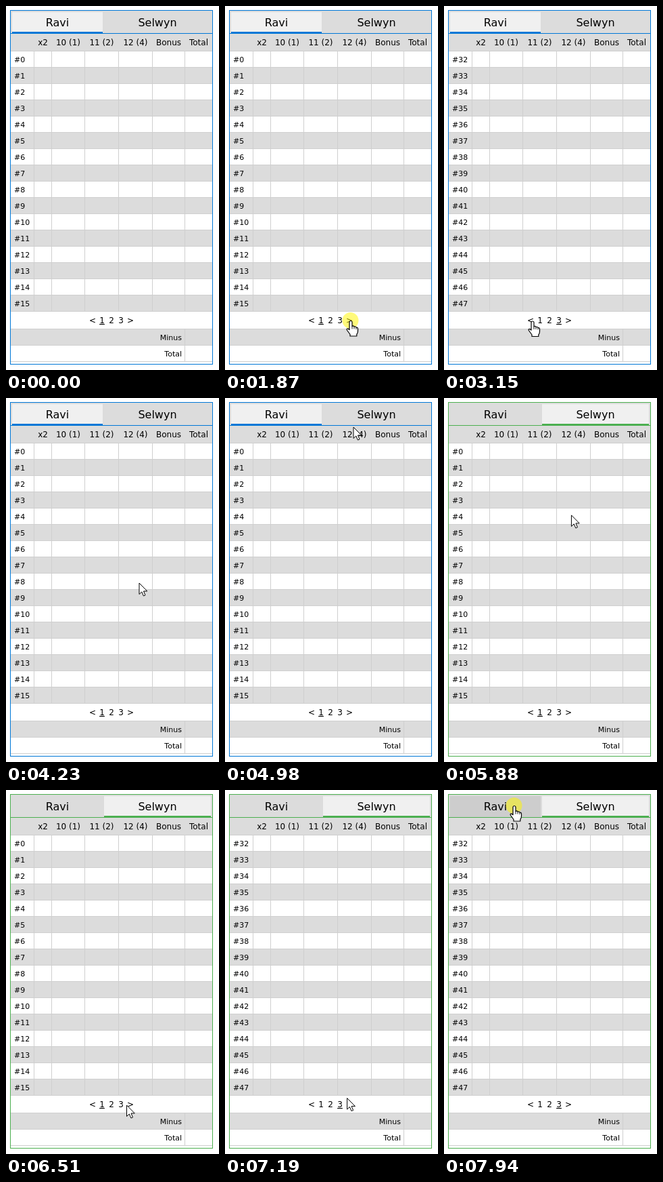
An HTML page for the animation above (8000 ms loop, 315x537 px).

```html
<!DOCTYPE html>
<html lang="en">
<head>
<meta charset="utf-8">
<title>Score sheet</title>
<style>
  html, body { margin: 0; width: 100%; height: 100%; overflow: hidden; background: #fff; }
  svg { display: block; width: 100vw; height: 100vh; font: 12px "DejaVu Sans", Verdana, sans-serif; }
  .name { font-size: 16px; }
  .small { font-size: 11px; }
</style>
</head>
<body>
<svg id="stage" viewBox="0 0 315 537"></svg>
<script>
const LOOP = 8000, ROWS = 16, ROW_H = 24, TOP = 67, LEFT = 7, WIDTH = 298;
const BLUE = [0, 120, 215], GREEN = [76, 175, 80];
const IDLE = [220, 220, 220], ACTIVE = [240, 240, 240], HOVER = 'rgb(205,205,205)';
const GREY = '#dcdcdc', LINE = '#cfcfcf';
const SWITCH = 5315, SWITCH_TIME = 500, HOLD = 65;

// [time, page step]; the step happens when the button is released
const clicks = [[1870, 1], [2470, 1], [3350, -1], [3760, -1], [5240, 0], [6780, 1], [7060, 1], [7935, 0]];

// pointer moves: [from, to, x, y]
const entry = { time: 530, x: 299, y: 421 };
const moves = [
  [530, 1140, 185.5, 464],
  [2540, 3150, 130.5, 464.5],
  [4090, 4230, 197, 273],
  [4230, 4850, 190, 43],
  [4980, 5240, 210, 23],
  [5300, 5470, 193.5, 23.5],
  [5470, 6510, 178.5, 465],
  [6510, 6650, 183, 463.5],
  [7130, 7800, 66, 24],
  [7800, 7930, 103.5, 23]
];

const tabs = [
  { name: 'Ravi', x: 9, w: 134, mid: 76 },
  { name: 'Selwyn', x: 145, w: 158, mid: 224 }
];
const heads = ['x2', '10 (1)', '11 (2)', '12 (4)', 'Bonus', 'Total'];
const edges = [41, 67, 116, 166, 216, 264, 305];

const stage = document.getElementById('stage');

function set(el, attrs) {
  for (const k in attrs) el.setAttribute(k, attrs[k]);
}
function add(parent, tag, attrs, text = '') {
  const el = document.createElementNS(stage.namespaceURI, tag);
  set(el, attrs);
  el.textContent = text;
  return parent.appendChild(el);
}
const rect = (p, x, y, width, height, fill) => add(p, 'rect', { x, y, width, height, fill });
const label = (p, x, y, text, anchor = 'middle', cls = '') =>
  add(p, 'text', { x, y, 'text-anchor': anchor, class: cls }, text);
const show = (el, on) => el.setAttribute('display', on ? 'inline' : 'none');

const lerp = (a, b, k) => a + (b - a) * k;
const mix = (a, b, k) => `rgb(${a.map((v, i) => Math.round(lerp(v, b[i], k)))})`;
const span = (t, from, to) => Math.min(1, Math.max(0, (t - from) / (to - from)));
const ease = k => (1 - Math.cos(Math.PI * k)) / 2;

rect(stage, 0, 0, 315, 537, '#fff');

// table
const table = add(stage, 'g', {});
const band = (y, h) => rect(table, LEFT, y, WIDTH, h, GREY);
const ruler = y => rect(table, LEFT, y, WIDTH, 1, LINE);

band(41, 26);
ruler(66);
const rowLabels = [];
for (let i = 0; i < ROWS; i++) {
  const y = TOP + i * ROW_H;
  if (i % 2) band(y, ROW_H);
  ruler(y + ROW_H - 1);
  rowLabels.push(label(table, 12, y + 16, '', 'start', 'small'));
}
heads.forEach((text, i) => {
  label(table, (edges[i] + edges[i + 1] + 1) / 2, 58, text);
  rect(table, edges[i], TOP, 1, ROWS * ROW_H, LINE);
});

// pager
const pagerX = i => 128 + i * 14;
const pager = [...'<123>'].map((s, i) => label(table, pagerX(i), 468, s));

// totals
band(476, 25);
[476, 500, 524].forEach(ruler);
rect(table, 264, 476, 1, 49, LINE);
['Minus', 'Total'].forEach((text, i) => label(table, 260, 493 + i * ROW_H, text, 'end', 'small'));

// tab bar
rect(stage, LEFT, 7, WIDTH, 33, GREY);
for (const tab of tabs) {
  tab.box = rect(stage, tab.x, 9, tab.w, 31, GREY);
  label(stage, tab.mid, 30, tab.name, 'middle', 'name');
}
const rule = rect(stage, LEFT, 40, WIDTH, 1);
const frame = add(stage, 'rect', { x: 6.5, y: 6.5, width: 299, height: 522, fill: 'none' });
const bar = rect(stage, 0, 38, 0, 3);

// pointer
const pointer = add(stage, 'g', { stroke: '#000', 'stroke-linejoin': 'round', fill: '#fff' });
const spot = add(pointer, 'circle', { r: 12, fill: '#fff600', 'fill-opacity': .52, stroke: 'none' });
const arrow = add(pointer, 'path', { d: 'M0 0V16.5L3.8 13L6.4 19L9 17.9L6.5 12H11.8z' });
const hand = add(pointer, 'g', { 'stroke-width': 1.2, transform: 'translate(.5 .5)' });
add(hand, 'path', {
  d: 'M-2 2a2 2 0 0 1 4 0V8q2-1.5 3 .7q2-1 3 1q2.5-.5 2.5 2V15q0 3-1.7 5V22.5H-1V20' +
     'L-5.7 13.5q-.8-2.5 2-1.8L-2 13.2z'
});
add(hand, 'path', { d: 'M2 8v4M5 9v3M8 10v2.5', fill: 'none', 'stroke-width': .9 });

function pointerAt(t) {
  let { x, y } = entry;
  for (const [from, to, nextX, nextY] of moves) {
    const k = ease(span(t, from, to));
    x = lerp(x, nextX, k);
    y = lerp(y, nextY, k);
  }
  return [x, y];
}

let shownPage = -1;
function showPage(page) {
  if (page === shownPage) return;
  shownPage = page;
  rowLabels.forEach((el, i) => el.textContent = '#' + (page * ROWS + i));
  pager.forEach((el, i) => el.setAttribute('text-decoration', i === page + 1 ? 'underline' : 'none'));
}

function draw(t) {
  const k = span(t, SWITCH, SWITCH + SWITCH_TIME), p = ease(k);
  const theme = mix(t < SWITCH ? BLUE : GREEN, GREEN, p);

  showPage(clicks.reduce((page, [time, step]) => t >= time + HOLD ? page + step : page, 0));
  table.setAttribute('opacity', 1 - .27 * Math.sin(Math.PI * k));
  frame.setAttribute('stroke', theme);
  rule.setAttribute('fill', theme);

  const [a, b] = tabs;
  const left = lerp(a.x, b.x, p), right = lerp(a.x + a.w, b.x + b.w, p);
  set(bar, { x: left, width: right - left, fill: mix(BLUE, GREEN, p) });

  const visible = t >= entry.time;
  const [x, y] = pointerAt(t);
  const onTabs = visible && y > 8 && y < 40;
  tabs.forEach((tab, i) => {
    const active = i ? p : 1 - p;
    const over = onTabs && x >= tab.x && x < tab.x + tab.w && active < 1;
    tab.box.setAttribute('fill', over ? HOVER : mix(IDLE, ACTIVE, active));
  });

  const onPager = Math.abs(y - 464) < 9 && pager.some((_, i) => Math.abs(x - pagerX(i)) < 5);
  pointer.setAttribute('transform', `translate(${x} ${y})`);
  show(pointer, visible);
  show(hand, onTabs || onPager);
  show(arrow, !onTabs && !onPager);
  show(spot, clicks.some(([time]) => t >= time && t < time + HOLD));
}

const start = performance.now();
function tick() {
  draw((performance.now() - start) % LOOP);
  requestAnimationFrame(tick);
}
tick();
</script>
</body>
</html>
```
